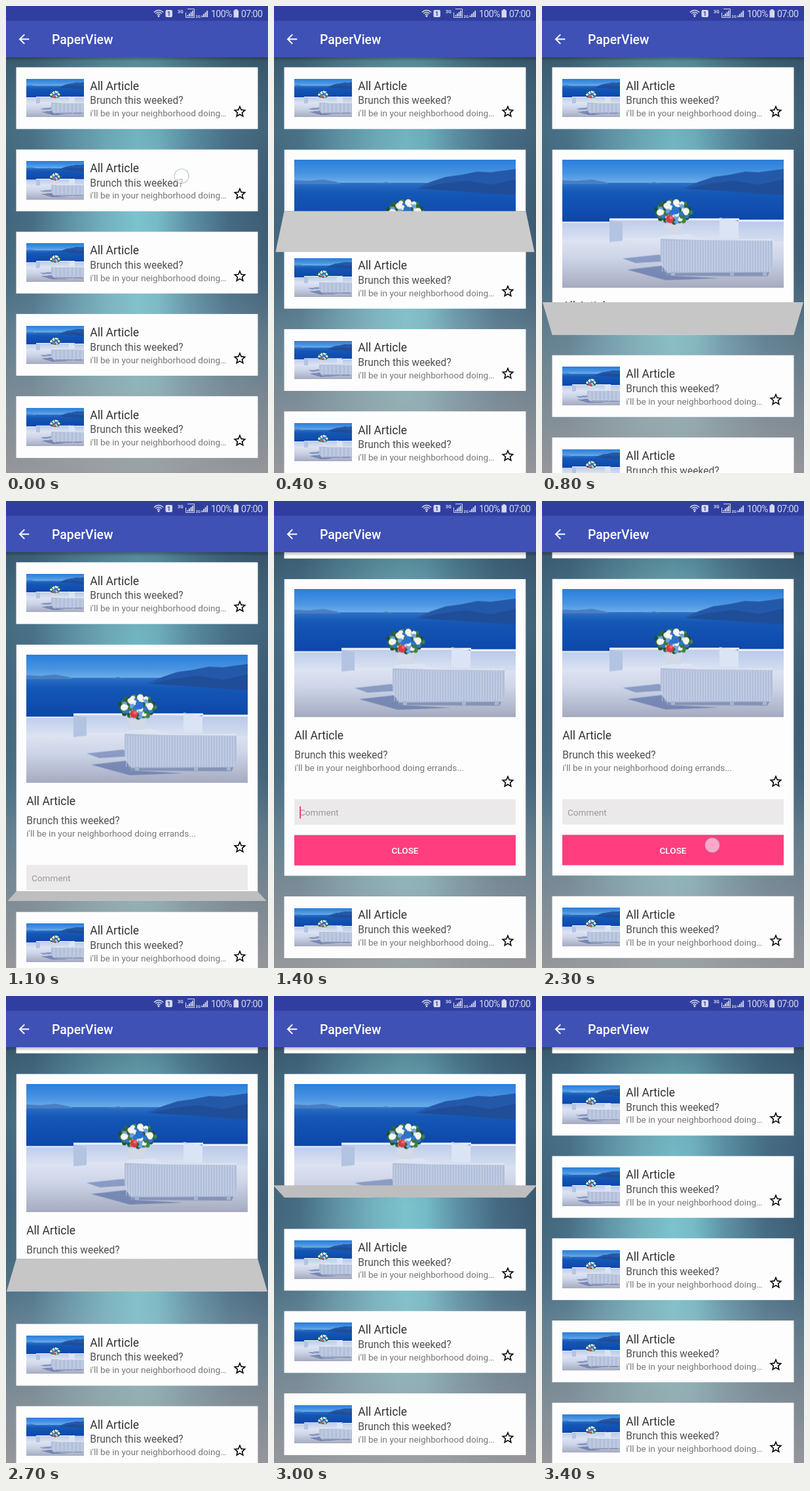
Write an HTML page with a canvas that moves like this. It is 400 px wide and 711 px high and loops after 3500 ms.

```html
<!DOCTYPE html>
<html lang="en">
<head>
<meta charset="utf-8">
<title>PaperView</title>
<style>
html, body { margin: 0; width: 100%; height: 100%; overflow: hidden; background: #3f6078; }
canvas { display: block; width: 100vw; height: 100vh; }
</style>
</head>
<body>
<canvas id="stage" width="400" height="711"></canvas>
<script>
const W = 400, H = 711, LOOP = 3500, STEP = 100;
const LEFT = 15.5, CARD_W = 369, FIRST = 93.3, PITCH = 125.2, GAP = 31.2;
const SEG = 94, LAST = 76, FULL = SEG * 4 + LAST;
const DEPTH = 1120, SINK = 700, STAGE_MS = 246, LAG = 30;
const OPEN_AT = 225, SCROLL_AT = 1200, CLOSE_AT = 2371;
const PAPER = '#fefdfe';

const stage = document.getElementById('stage').getContext('2d');
const clamp = (v, a, b) => Math.max(a, Math.min(b, v));

function layer(w, h, paint) {
  const c = document.createElement('canvas');
  c.width = w;
  c.height = h;
  paint(c.getContext('2d'));
  return c;
}

function poly(g, fill, ...pts) {
  g.fillStyle = fill;
  g.beginPath();
  for (let i = 0; i < pts.length; i += 2) g.lineTo(pts[i], pts[i + 1]);
  g.fill();
}

function rect(g, fill, x, y, w, h) {
  g.fillStyle = fill;
  g.fillRect(x, y, w, h);
}

function dot(g, fill, x, y, r) {
  g.fillStyle = fill;
  g.beginPath();
  g.arc(x, y, r, 0, Math.PI * 2);
  g.fill();
}

// Stops are offset, colour pairs
function fade(g, x0, y0, x1, y1, ...stops) {
  const f = g.createLinearGradient(x0, y0, x1, y1);
  for (let i = 0; i < stops.length; i += 2) f.addColorStop(stops[i], stops[i + 1]);
  return f;
}

function text(g, str, x, y, size, fill, weight = 400, align = 'left') {
  g.font = `${weight} ${size}px Roboto, "Noto Sans", sans-serif`;
  g.textAlign = align;
  g.fillStyle = fill;
  g.fillText(str, x, y);
}

const backdrop = layer(W, H, g => {
  rect(g, fade(g, 0, 0, W, 0, 0, '#43667d', 0.1, '#476e84', 0.25, '#6398aa', 0.38, '#77b8c4',
    0.5, '#80cbd4', 0.58, '#7ac2cd', 0.7, '#5f94a8', 0.85, '#456b83', 1, '#3c5a72'), 0, 0, W, H);
  rect(g, fade(g, 0, 78, 0, H, 0, 'rgba(48,78,98,.55)', 0.18, 'rgba(78,122,142,.3)', 0.38, 'rgba(60,100,125,.08)',
    0.54, 'rgba(125,155,168,.14)', 0.66, 'rgba(150,170,177,.36)', 0.82, 'rgba(157,160,163,.62)',
    1, 'rgba(158,156,158,.9)'), 0, 0, W, H);
});

const photo = layer(338, 194, g => {
  rect(g, fade(g, 0, 0, 0, 36, 0, '#2b7edb', 0.6, '#4a95e2', 1, '#6fb0ea'), 0, 0, 338, 36);
  rect(g, fade(g, 0, 35, 0, 95, 0, '#2d70c6', 0.25, '#1558b6', 1, '#0d46aa'), 0, 35, 338, 62);
  poly(g, '#4a7ec2', 0, 31, 22, 32, 45, 30, 66, 34, 72, 37, 0, 37);
  poly(g, '#3f74bb', 124, 37, 140, 34, 152, 37);
  poly(g, '#2458a8', 184, 44, 207, 34, 231, 26, 254, 23, 279, 18, 300, 19, 338, 14, 338, 54, 270, 49);
  poly(g, '#1f4d98', 190, 44, 222, 37, 262, 32, 300, 38, 338, 30, 338, 54, 270, 49);

  rect(g, fade(g, 0, 115, 0, 194, 0, '#e3e7f4', 0.45, '#ccd4e8', 1, '#a6abc0'), 0, 112, 338, 82);
  rect(g, fade(g, 0, 94, 0, 125, 0, '#becdec', 1, '#dde4f3'), 0, 94, 92, 31);
  rect(g, fade(g, 0, 89, 0, 119, 0, '#bccbea', 1, '#d9e1f2'), 72, 89, 172, 30);
  rect(g, '#eef2fb', 72, 89, 198, 3);
  rect(g, '#e6ecf8', 0, 94, 72, 2);
  poly(g, '#b3c3e2', 72, 92, 92, 95, 92, 123, 72, 125);
  poly(g, '#dbe4f5', 240, 88, 269, 93, 269, 118, 240, 118);
  rect(g, fade(g, 0, 92, 0, 124, 0, '#b9c9e8', 1, '#d4def0'), 269, 92, 69, 32);
  rect(g, '#eef2fb', 269, 91, 69, 3);

  poly(g, 'rgba(104,127,178,.65)', 92, 150, 148, 144, 160, 154, 112, 157);
  poly(g, 'rgba(96,118,170,.75)', 99, 167, 152, 161, 164, 176, 240, 180, 158, 183);
  poly(g, '#8593b6', 155, 168, 318, 168, 313, 177, 160, 176);
  poly(g, '#b2bfda', 150, 117, 165, 114, 200, 114, 206, 119, 321, 120, 321, 158, 317, 171, 160, 172, 150, 153);
  poly(g, '#dce4f3', 150, 117, 165, 113, 198, 113, 208, 119, 321, 120, 321, 123, 205, 122, 150, 120);
  g.fillStyle = 'rgba(222,229,243,.4)';
  for (let x = 152; x < 320; x += 4) g.fillRect(x, 123, 1.6, 47);
  for (const x of [166, 256, 306]) rect(g, '#a9b5d0', x, 170, 6, 6);

  poly(g, '#d3d9e6', 155, 98, 184, 98, 180, 106, 176, 110, 182, 114, 158, 114, 162, 110, 157, 105);
  // Golden-angle spread fills the bouquet evenly
  const cluster = (n, rx, ry, r, ...fills) => {
    for (let i = n - 1; i >= 0; i--) {
      const a = i * 2.4, d = Math.sqrt((i + 0.5) / n);
      dot(g, fills[i % fills.length], 170 + Math.cos(a) * rx * d, 79 + Math.sin(a) * ry * d, r);
    }
  };
  cluster(60, 27, 17, 3.6, '#2f6b34', '#3f8440', '#1f4f2d');
  cluster(34, 24, 15, 3.7, '#f2f0ee', '#2f74d0', '#3b7740', '#f7f6f4', '#6ea2e2', '#2d5f3a', '#dfe0da');
  for (const [x, y] of [[149, 80], [174, 65], [160, 70], [189, 78]]) dot(g, '#f5f4f2', x, y, 5);
  dot(g, '#2b70d2', 173, 77, 6);
  dot(g, '#d93a48', 164, 90, 6);
  dot(g, '#ee6c66', 166, 88, 2.5);
});

const starPath = new Path2D('M22 9.24l-7.19-.62L12 2 9.19 8.63 2 9.24l5.46 4.73L5.82 21 12 17.27 18.18 21l-1.63-7.03L22 9.24z' +
  'M12 15.4l-3.76 2.27 1-4.28-3.32-2.88 4.38-.38L12 6.1l1.71 4.04 4.38.38-3.32 2.88 1 4.28L12 15.4z');

function star(g, cy) {
  g.save();
  g.translate(345.3, cy - 11.2);
  g.scale(0.973, 0.973);
  g.fillStyle = '#000';
  g.fill(starPath, 'evenodd');
  g.restore();
}

function summary(g, y) {
  rect(g, PAPER, LEFT, y, CARD_W, SEG);
  const crop = 194 * 87.5 / 58;
  g.drawImage(photo, (338 - crop) / 2, 0, crop, 194, 31, y + 17.7, 87.5, 58.3);
  text(g, 'All Article', 128.3, y + 34.4, 17.5, '#303030');
  text(g, 'Brunch this weeked?', 128.3, y + 56, 15.57, '#505050');
  text(g, 'i\'ll be in your neighborhood doing…', 128.3, y + 74.8, 13.62, '#777');
  star(g, y + 67);
}

function details(g, y, height, caret) {
  g.save();
  g.beginPath();
  g.rect(LEFT, y, CARD_W, height);
  g.clip();
  rect(g, PAPER, LEFT, y, CARD_W, FULL);
  g.drawImage(photo, 31, y + 15.6, 338, 194.4);
  text(g, 'All Article', 31.2, y + 244.2, 17.5, '#303030');
  text(g, 'Brunch this weeked?', 31.2, y + 273.6, 15.57, '#505050');
  text(g, 'i\'ll be in your neighborhood doing errands...', 31.2, y + 292.6, 13.62, '#777');
  star(g, y + 308);
  rect(g, '#ebe9ea', 31, y + 335.5, 338, 38.5);
  text(g, 'Comment', 39, y + 360.2, 13.62, '#9a999a');
  if (caret) rect(g, '#ff4081', 39, y + 346, 2, 18.5);
  rect(g, '#ff3d7f', 31, y + 389.8, 338, 46.2);
  text(g, 'CLOSE', 200, y + 418.4, 13.62, '#fff', 500, 'center');
  g.restore();
}

// Fold state from 0 (closed) to 4 (open)
function foldAt(t) {
  return t < CLOSE_AT
    ? clamp((t - OPEN_AT) / STAGE_MS, 0, 4)
    : clamp(4 - (t - CLOSE_AT) / STAGE_MS, 0, 4);
}

function flapOf(u) {
  const k = Math.min(3, Math.floor(u));
  return { k, angle: (u - k) * Math.PI, hinge: SEG * (k + 1), len: k === 3 ? LAST : SEG };
}

function cardHeight(u) {
  const f = flapOf(u);
  const s = SINK / (SINK + f.len * Math.sin(f.angle));
  return f.hinge + f.len * s * Math.max(0, -Math.cos(f.angle));
}

const cover = layer(W, SEG, () => {});

function flap(g, top, f) {
  const project = d => {
    const s = DEPTH / (DEPTH - d * Math.sin(f.angle));
    return { y: top + f.hinge - d * Math.cos(f.angle) * s, s };
  };
  if (f.k === 0 && f.angle < Math.PI / 2) {
    summary(cover.getContext('2d'), 0);
    for (let d = 0; d < SEG; d++) {
      const a = project(d), b = project(d + 1), w = CARD_W * b.s;
      g.drawImage(cover, LEFT, SEG - d - 1, CARD_W, 1, 200 - w / 2, b.y, w, a.y - b.y + 0.5);
    }
    return;
  }
  const edge = project(f.len), half = CARD_W / 2;
  const tilt = Math.min(f.angle, Math.PI - f.angle) * 180 / Math.PI;
  const v = Math.round(228 - 0.47 * tilt);
  const y = top + f.hinge;
  poly(g, `rgb(${v},${v - 1},${v - 1})`, 200 - half, y, 200 + half, y,
    200 + half * edge.s, edge.y, 200 - half * edge.s, edge.y);
}

function bars(g, x, base, n, w, h, fill) {
  for (let i = 0; i < n; i++) {
    const b = h * (i + 1) / n;
    rect(g, fill, x + i * w, base - b, w - 0.8, b);
  }
}

function header(g) {
  const ink = '#d6d9ec';
  rect(g, fade(g, 0, 78, 0, 84, 0, 'rgba(0,0,0,.25)', 1, 'rgba(0,0,0,0)'), 0, 78, W, 6);
  rect(g, '#3f51b5', 0, 22, W, 56);
  rect(g, '#303f9f', 0, 0, W, 22.5);

  g.strokeStyle = '#fff';
  g.lineWidth = 2;
  g.beginPath();
  g.moveTo(35.3, 50.5);
  g.lineTo(21, 50.5);
  g.moveTo(28.2, 43.4);
  g.lineTo(21, 50.5);
  g.lineTo(28.2, 57.6);
  g.stroke();
  text(g, 'PaperView', 70, 58, 19.46, '#fff', 500);

  g.strokeStyle = ink;
  g.lineWidth = 1.4;
  for (const r of [3, 6, 9]) {
    g.beginPath();
    g.arc(233, 15.5, r, -Math.PI * 0.78, -Math.PI * 0.22);
    g.stroke();
  }
  dot(g, ink, 233, 15.5, 1.4);
  g.fillStyle = ink;
  g.beginPath();
  g.roundRect(243.5, 6, 10.5, 11, 2);
  g.fill();
  text(g, '1', 248.7, 15, 9, '#303f9f', 700, 'center');
  text(g, '3G', 262, 11, 7, ink, 700);
  g.lineWidth = 1;
  g.beginPath();
  g.moveTo(277, 4.5);
  g.lineTo(287.5, 4.5);
  g.lineTo(287.5, 17.5);
  g.lineTo(274.5, 17.5);
  g.lineTo(274.5, 10);
  g.stroke();
  bars(g, 276.5, 16, 4, 2.6, 9, ink);
  text(g, '2G', 289.5, 17.5, 6, ink, 700);
  bars(g, 298.5, 17, 4, 2.6, 10, ink);
  rect(g, ink, 347.5, 6.5, 7.5, 11);
  rect(g, ink, 349.5, 5, 3.5, 2);
  g.letterSpacing = '-0.6px';
  text(g, '100%', 313, 17, 14.2, ink);
  text(g, '07:00', 359, 17, 14.2, ink);
  g.letterSpacing = '0px';
}

function touch(g, x, y, fill) {
  dot(g, fill, x, y, 11);
  g.strokeStyle = 'rgba(150,175,185,.6)';
  g.lineWidth = 1.2;
  g.beginPath();
  g.arc(x, y, 11, 0, Math.PI * 2);
  g.stroke();
}

function draw(t) {
  const g = stage;
  const u = foldAt(t);
  const scroll = 100 * (1 - Math.pow(1 - clamp((t - SCROLL_AT) / 260, 0, 1), 4));
  const top = FIRST + PITCH - scroll;
  const below = top + cardHeight(foldAt(t - LAG)) + GAP;

  g.drawImage(backdrop, 0, 0);
  summary(g, FIRST - scroll);
  for (let i = 0; i < 5; i++) {
    const y = below + i * PITCH;
    if (y < H) summary(g, y);
  }
  if (u === 0) summary(g, top);
  else if (u === 4) details(g, top, FULL, t >= 1250 && t < 1700);
  else {
    const f = flapOf(u);
    details(g, top, f.hinge, false);
    flap(g, top, f);
  }
  if (t < 200) touch(g, 268, 259, 'rgba(255,255,255,.6)');
  if (t >= 2200 && t < 2400) touch(g, 260, 524, 'rgba(255,225,238,.65)');
  header(g);
}

// The picture advances ten times a second
function tick() {
  const t = performance.now() % LOOP;
  draw(Math.floor(t / STEP) * STEP);
  requestAnimationFrame(tick);
}
tick();
</script>
</body>
</html>
```
